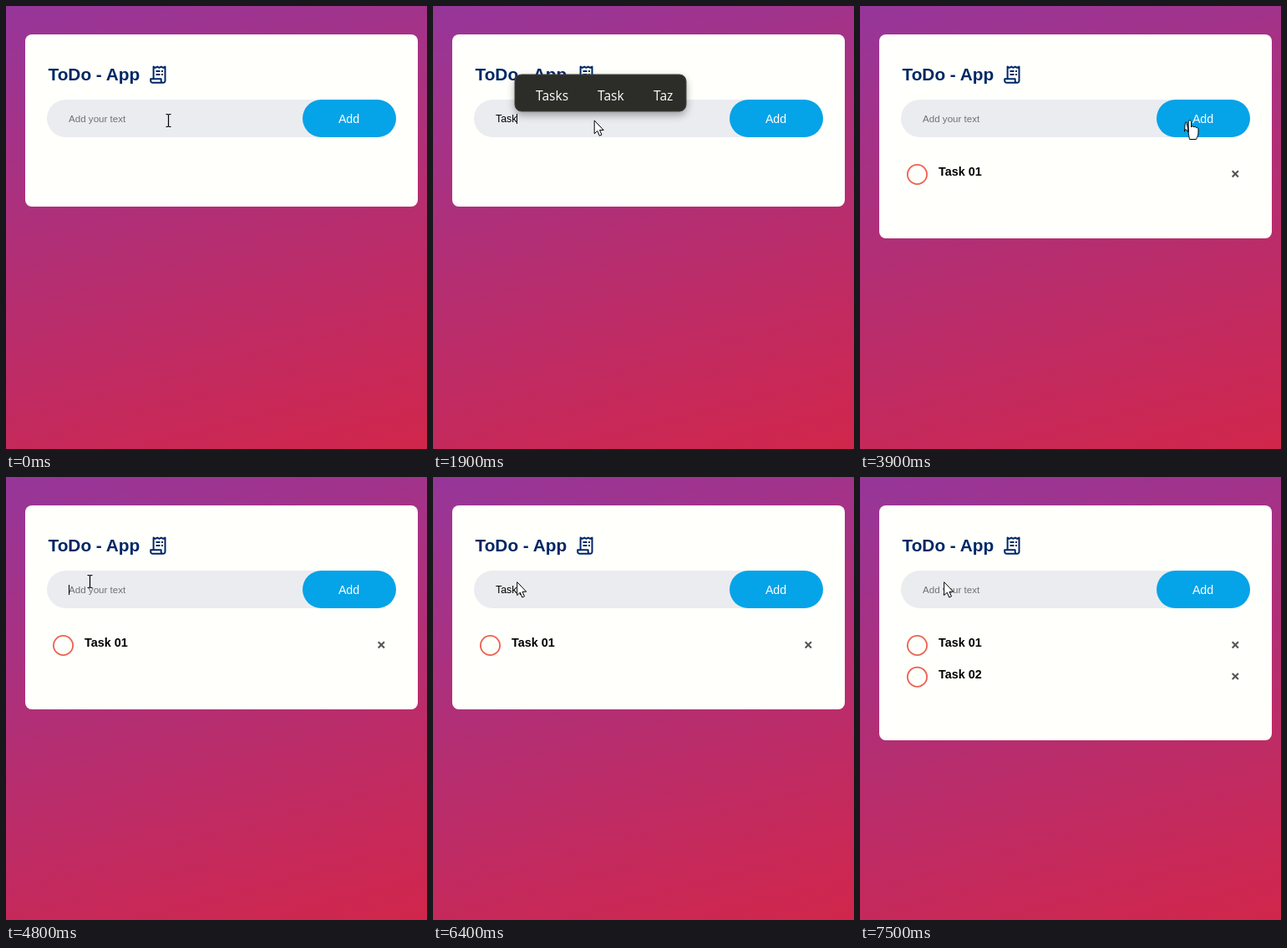
Animation of 504x530 px, one loop 8 s. Source, as an HTML page:

```html
<!DOCTYPE html>
<html lang="en">
<head>
<meta charset="utf-8">
<title>ToDo - App</title>
<style>
  html, body { margin: 0; width: 100%; height: 100%; overflow: hidden; }
  body { background: linear-gradient(165deg, #96369a, #d1264b); }
  svg { display: block; width: 504px; height: 530px; }
  text { font-family: "Liberation Sans", Arial, sans-serif; white-space: pre; }
  .title { font-size: 20.8px; font-weight: 700; fill: #002765; }
  .hint { font-size: 11.6px; fill: #707174; }
  .typed { font-size: 12.4px; fill: #000; }
  .add { font-size: 14.2px; fill: #fff; text-anchor: middle; }
  .task text { font-size: 14.4px; font-weight: 700; }
  .task circle { fill: none; stroke: #ee604e; stroke-width: 1.8; }
  .task path { stroke: #555; stroke-width: 2.1; }
  .popup rect { fill: #2c2d28; stroke: #45453f; filter: drop-shadow(0 4px 5px #0005); }
  .popup text { font: 15.6px "Open Sans", "Noto Sans", sans-serif; fill: #fff; }
  .icon { fill: none; stroke: #002765; stroke-width: 2; stroke-linejoin: round; }
</style>
</head>
<body>
<svg viewBox="0 0 504 530">
  <rect id="card" x="23" y="34" width="470" height="206" rx="8" fill="#fffffc"/>
  <text class="title" x="50.5" y="89">ToDo - App</text>
  <g class="icon">
    <path d="M176.6 87V72.6l2.3 1.2 2.3-1.2 2.3 1.2 2.3-1.2 2.3 1.2 2.4-1.2V89.5a2.3 2.3 0 0 1-2.3 2.3H175.5a2.3 2.3 0 0 1-2.3-2.3V87.2H185.7V89.5a2.3 2.3 0 0 0 2.3 2.3"/>
    <path d="M179.5 78h5M186 78h2M179.5 82h5M186 82h2"/>
  </g>
  <rect x="49" y="112" width="418" height="45" rx="22.5" fill="#ebecf0"/>
  <rect x="355" y="112" width="112" height="45" rx="22.5" fill="#05a3e8"/>
  <text class="add" x="410.5" y="140">Add</text>
  <text class="hint" id="hint" x="75" y="139">Add your text</text>
  <text class="typed" id="typed" x="75" y="139"></text>
  <rect id="caret" y="129" width="1" height="12"/>
  <g id="tasks"></g>
  <g id="popups"></g>
  <g id="cursor" stroke="#000" fill="#fff">
    <path id="beam" fill="none" stroke-width="1.2" d="M-2.5-7.5H-.7L.5-6.8 1.7-7.5H3.5M.5-7V7M-2.5 7.5H-.7L.5 6.8 1.7 7.5H3.5"/>
    <path id="arrow" d="M.7.7V16.5L4.3 13.2 6.8 19 9.5 17.8 7 12.2H11.7Z"/>
    <path id="hand" stroke-linejoin="round" d="M-1.8 1.5C-1.8-.7 1.6-.7 1.6 1.5V8C1.6 6.3 4.6 6.4 4.8 8 5.2 7 7.4 7.2 7.6 8.8 8.4 8 10 8.6 10 10.2V15C10 18 8.5 20 7.5 22.5H-.5C-1.5 19.5-5-16 -6.5 13.2-7.5 11-4.7 9.8-3.4 12L-1.8 14Z"/>
  </g>
</svg>
<script>
const LOOP = 8000, STEP = 100;
const $ = id => document.getElementById(id);
const show = (el, on) => { el.style.display = on ? '' : 'none'; };

// Each timeline lists [start in ms, value].
const typing = [
  [0, ''], [1400, 'T'], [1600, 'Ta'], [1700, 'Tas'], [1900, 'Task'], [2100, 'Task '],
  [2500, 'Task 0'], [2700, 'Task 01'], [3900, ''],
  [5600, 'T'], [5800, 'Ta'], [5900, 'Tas'], [6000, 'Task'], [6200, 'Task '],
  [6600, 'Task 0'], [6900, 'Task 02'], [7400, '']
];
const caretOn = [[0, 0], [100, 1], [600, 0], [1100, 1], [3800, 0], [4800, 1], [7400, 0]];
const popupName = [
  [0, ''], [1600, 'ta'], [1900, 'tas'], [2000, 'task'], [2300, ''],
  [5800, 'ta'], [6000, 'tas'], [6100, 'task'], [6400, '']
];
const pointer = [[0, 'beam'], [1100, ''], [1600, 'arrow'], [3100, 'auto'], [5600, ''], [5800, 'arrow']];
const taskCount = [[0, 0], [3900, 1], [7400, 2]];
const cardHeights = [206, 244, 281];

const suggestions = {
  ta: { x: 90, w: 219, words: [['Take', 115], ['Take a', 183], ['Talk', 265]] },
  tas: { x: 98, w: 205, words: [['Tasks', 123], ['Task', 197], ['Taz', 264]] },
  task: { x: 104, w: 252, words: [['Tasks', 129], ['Tasking', 203], ['Tasked', 292]] }
};

$('popups').innerHTML = Object.entries(suggestions).map(([name, { x, w, words }]) =>
  `<g class="popup" id="${name}"><rect x="${x}" y="82" width="${w}" height="44" rx="8"/>` +
  words.map(([word, wx]) => `<text x="${wx}" y="113">${word}</text>`).join('') + '</g>').join('');

$('tasks').innerHTML = ['Task 01', 'Task 02'].map((label, i) =>
  `<g class="task" transform="translate(0 ${i * 37.7})"><circle cx="68.5" cy="201.5" r="11.6"/>` +
  `<text x="94" y="203">${label}</text><path d="M445.7 197.2l7.2 7.2m0-7.2l-7.2 7.2"/></g>`).join('');

const at = (line, t) => line.findLast(([start]) => start <= t)[1];
const ease = (t, from, to) => {
  const p = Math.min(1, Math.max(0, (t - from) / (to - from)));
  return p * p * (3 - 2 * p);
};

function draw(t) {
  const text = at(typing, t);
  $('typed').textContent = text;
  show($('hint'), !text);
  show($('caret'), at(caretOn, t));
  $('caret').setAttribute('x', Math.round(75 + (text ? $('typed').getComputedTextLength() : 0)));

  const popup = at(popupName, t);
  for (const name in suggestions) show($(name), name === popup);

  const count = at(taskCount, t);
  $('card').setAttribute('height', cardHeights[count]);
  [...$('tasks').children].forEach((task, i) => show(task, i < count));

  const out = ease(t, 3000, 3700), back = ease(t, 3900, 4700);
  const x = 194 + 201 * out - 295 * back, y = 137 - 12 * back;
  let kind = at(pointer, t);
  if (kind === 'auto') kind = x > 355 ? 'hand' : 'beam';
  for (const name of ['beam', 'arrow', 'hand']) show($(name), name === kind);
  const shift = kind === 'arrow' && t < 3100 ? -1.5 : 0;
  $('cursor').setAttribute('transform', `translate(${x + shift} ${y + shift / 2})`);
}

const begin = performance.now();
function tick() {
  const t = (performance.now() - begin) % LOOP;
  draw(Math.floor(t / STEP) * STEP);
  requestAnimationFrame(tick);
}
tick();
</script>
</body>
</html>
```
